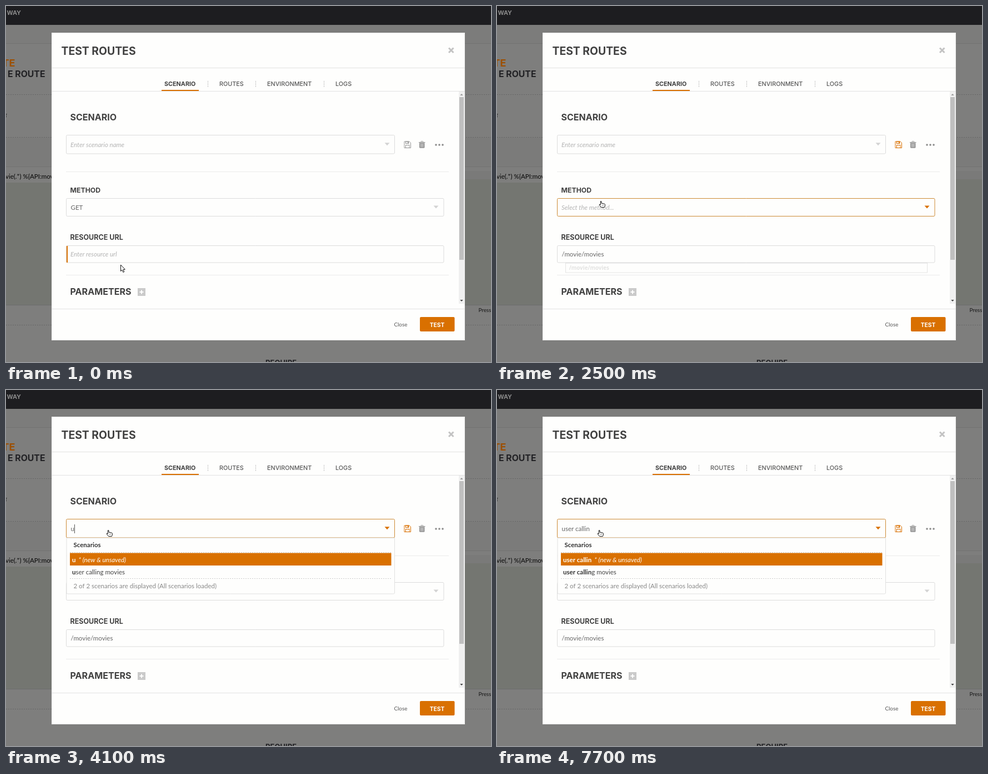
Write an HTML page with a canvas that moves like this. It is 873 by 641 pixels and loops after 8000 ms.

```html
<!DOCTYPE html>
<html lang="en">
<head>
<meta charset="utf-8">
<title>Test routes dialog</title>
<style>
html, body { margin: 0; width: 100%; height: 100%; overflow: hidden; background: #7e7e7d; }
canvas { display: block; }
</style>
</head>
<body>
<canvas id="stage" width="873" height="641"></canvas>
<script>
const ctx = document.getElementById('stage').getContext('2d');
const LOOP = 8000;
const ORANGE = '#d97000', PAPER = '#fefefd', INK = '#414141', GRAY = '#666', PALE = '#b4b4b4';
const HEAD = 'Inter, sans-serif', BODY = 'Lato, sans-serif', LIST = '"Open Sans", sans-serif';
const body = '11.5px ' + BODY, bold = 'bold ' + body, italic = 'italic ' + body;
const head = size => `bold ${size}px ${HEAD}`;

// Pointer stops: time, x, y, shape
const POINTER = [
  [0, 206, 466, 'arrow'], [300, 205, 462, 'arrow'], [500, 203, 454, 'beam'],
  [700, 199, 450, 'beam'], [1900, 201, 453, 'beam'], [2100, 200, 440, 'beam'],
  [2200, 194, 398, 'arrow'], [2300, 190, 366, 'hand'], [2400, 189, 359, 'hand'],
  [2500, 189, 357, 'hand'], [2700, 188, 342, 'arrow'], [2800, 186, 308, 'arrow'],
  [2900, 185, 279, 'arrow'], [3000, 184, 265, 'arrow'], [3100, 185, 262, 'hand'],
  [3200, 186, 259, 'hand'], [3300, 186, 258, 'hand']
];
// Time and number of characters typed
const TYPED = [[0, 0], [4100, 1], [4800, 2], [5000, 3], [5100, 4], [5700, 5], [6100, 6],
  [6200, 7], [6600, 8], [6700, 9], [6900, 10], [7100, 11]];
const NAME = 'user calling movies';
const ROUTES = ['/app', '/app/headers', '/app/uuid', '/test-http-signatures-auth', '/app/',
  '/test-httpbin/headers'];

const at = (keys, t) => keys.filter(k => k[0] <= t).pop();
const within = (t, a, b) => t >= a && t < b;

function rect(x, y, w, h, color) {
  ctx.fillStyle = color;
  ctx.fillRect(x, y, w, h);
}

function text(str, x, y, font, color, align = 'left') {
  ctx.font = font;
  ctx.fillStyle = color;
  ctx.textAlign = align;
  ctx.fillText(str, x, y);
  return x + ctx.measureText(str).width;
}

function round(x, y, w, h, r, fill, stroke) {
  ctx.beginPath();
  ctx.roundRect(x, y, w, h, r);
  if (fill) { ctx.fillStyle = fill; ctx.fill(); }
  if (stroke) { ctx.strokeStyle = stroke; ctx.lineWidth = 1; ctx.stroke(); }
}

function poly(points, fill, stroke) {
  ctx.beginPath();
  points.forEach(p => ctx.lineTo(p[0], p[1]));
  ctx.closePath();
  if (fill) { ctx.fillStyle = fill; ctx.fill(); }
  if (stroke) { ctx.strokeStyle = stroke; ctx.lineWidth = 1; ctx.stroke(); }
}

function dots(x, y, end, color, step = 4) {
  for (; x < end; x += step) rect(x, y, 2, 1, color);
}

const triangle = (x, y, w, h, color) => poly([[x - w, y], [x + w, y], [x, y + h]], color);
const caret = (x, y) => rect(Math.round(x), y, 1, 16, '#555');

function backdrop() {
  rect(0, 0, 873, 641, '#7e7e7d');
  rect(0, 0, 873, 34, '#1d1d20');
  rect(0, 34, 873, 33, '#7c7c7b');
  rect(0, 67, 873, 1, '#727272');
  rect(0, 237, 873, 53, '#7b7b7a');
  rect(0, 289, 873, 1, '#727272');
  rect(0, 297, 873, 241, '#747671');
  rect(0, 297, 82, 21, '#7e7e7d');
  rect(826, 297, 47, 15, '#7a7a79');
  rect(0, 538, 873, 1, '#6c6c6c');
  [159, 236, 574].forEach(y => dots(0, y, 873, '#666'));
  text('WAY', 27, 15.5, head(10.8), '#8b8b8b', 'right');
  text('TE', 16.5, 109, head(18), '#9c4f00', 'right');
  text('E ROUTE', 70.5, 128, head(15.8), '#222225', 'right');
  text('g', -3, 199, 'italic 10px ' + BODY, '#333');
  text('vie(.*) %{API:movie', -1, 311, body, '#050505');
  text('Press', 850.5, 551, '9.8px ' + BODY, '#161616');
  text('REQUIRE', 467, 647, head(13), '#222225');
}

function floppy(color) {
  poly([[717, 244], [726, 244], [728.5, 246.5], [728.5, 255.5], [717, 255.5]], null, color);
  ctx.strokeRect(719.5, 250.5, 6.5, 5);
  ctx.strokeRect(719.5, 244, 5, 3.5);
  rect(723, 244, 1.5, 3.5, color);
}

function trash() {
  const c = '#979797';
  rect(743, 245, 11.5, 1.3, c);
  round(746.8, 243.6, 4, 2, 1, null, c);
  round(744, 246.5, 9.5, 9.2, [0, 0, 1.5, 1.5], c);
  [746.3, 748.3, 750.3].forEach(x => rect(x, 248, .8, 5.8, '#e2e2e2'));
}

function field(x, y, w, h, active, arrowX) {
  round(x, y, w, h, 2, PAPER, active ? '#cc8a35' : '#dcdcdc');
  if (arrowX) triangle(arrowX, y + h / 2 - 3, 4.5, 5, active ? ORANGE : '#d3d3d3');
}

function dialog(t) {
  rect(82, 48, 744, 554, '#efefee');
  rect(83, 49, 742, 552, PAPER);
  text('TEST ROUTES', 99.5, 88, head(19.4), INK);
  ctx.lineWidth = 3;
  ctx.strokeStyle = '#c3c3c3';
  ctx.beginPath();
  ctx.moveTo(797, 75.5); ctx.lineTo(805.5, 84);
  ctx.moveTo(805.5, 75.5); ctx.lineTo(797, 84);
  ctx.stroke();

  [111, 153, 545].forEach(y => rect(82, y, 744, 1, '#e2e2e2'));
  text('SCENARIO', 285, 144, head(10.8), INK);
  const tab = '500 10.8px ' + HEAD;
  text('ROUTES', 384, 144, tab, '#595959');
  text('ENVIRONMENT', 470, 144, tab, '#595959');
  text('LOGS', 593, 144, tab, '#595959');
  [363, 449, 572].forEach(x => {
    for (let y = 135; y < 146; y += 3) rect(x, y, 1, 1.5, '#aaa');
  });
  rect(280, 151, 67, 2, ORANGE);

  rect(815, 154, 11, 382, '#f0f0f0');
  rect(816, 164, 8, 293, '#bfbfbf');
  triangle(820, 161, 2.7, -3, '#999');
  triangle(820, 529, 2.7, 3, '#444');

  text('SCENARIO', 115.5, 206, head(16), INK);
  floppy(t < 1500 ? '#979797' : ORANGE);
  trash();
  [774, 780, 786].forEach(x => {
    ctx.beginPath();
    ctx.arc(x, 250, 1.8, 0, 7);
    ctx.fillStyle = '#8b8b8b';
    ctx.fill();
  });
  [298, 484].forEach(y => rect(108, y, 689, 1, '#ebebeb'));

  text('METHOD', 115.5, 335.5, head(12.3), INK);
  field(108.5, 346.5, 679.5, 32, within(t, 2300, 2700), 774);
  if (within(t, 2400, 2700)) text('Select the method...', 116, 367, italic, PALE);
  else text('GET', 116.5, 367, body, GRAY);

  text('RESOURCE URL', 115.5, 421, head(12.5), INK);
  text('PARAMETERS', 115.5, 520, head(16.1), INK);
  rect(237, 508, 14, 14, '#cacaca');
  rect(240.5, 514, 7, 2, PAPER);
  rect(243, 511.5, 2, 7, PAPER);

  text('Close', 698.5, 577, '9.8px ' + BODY, '#555');
  round(745, 560, 62.5, 26, 2, ORANGE);
  text('TEST', 776, 577.7, head(10.3), PAPER, 'center');
}

function suggestions(items) {
  const h = 1 + items.length * 16.85;
  rect(108.5, 462.5, 681, h, '#fff');
  ctx.strokeStyle = '#111';
  ctx.lineWidth = 1;
  ctx.strokeRect(108.5, 462.5, 681, h);
  items.forEach((s, i) => text(s, 115, 475 + i * 16.8, 'bold 10.2px ' + LIST, '#000'));
}

function urlField(t) {
  field(108.5, 431.5, 679.5, 30.5, within(t, 700, 2400));
  if (t < 1500) rect(109, 432, 2, 30, ORANGE);
  if (t < 700) text('Enter resource url', 116, 451, italic, PALE);
  if (within(t, 700, 1200)) caret(116, 438);
  if (t >= 1500) {
    const end = text('/movie/movies', 116.5, 451, body, GRAY);
    if (t < 2400) caret(end, 438);
  }
  if (within(t, 800, 1500)) suggestions(ROUTES);
  if (within(t, 1500, 2700)) {
    // The popup shrinks and fades as it closes
    const p = Math.min(1, Math.max(0, (t - 2300) / 200));
    const s = 1 - .044 * p;
    ctx.save();
    ctx.globalAlpha = 1 - .89 * p;
    ctx.translate(449, 472);
    ctx.scale(s, s);
    ctx.translate(-449, -472);
    suggestions(['/movie/movies']);
    ctx.restore();
  }
}

function scenarioList(typed) {
  const extra = typed ? 22.5 : 0;
  round(109, 266.5, 590.5, 78 + extra, [0, 0, 2, 2], PAPER, '#e0e0e0');
  text('Scenarios', 121.5, 283, bold, '#333');
  dots(115, 292, 693, '#ccc');
  rect(115, 293.5, 578.5, 22.5, ORANGE);
  if (typed) {
    const end = text(typed.trimEnd(), 119, 309.5, bold, '#fff');
    text('* (new & unsaved)', end + 5, 309.5, italic, '#fff');
    const rest = text(typed, 119, 332, bold, '#333');
    text(NAME.slice(typed.length), rest, 332, body, '#444');
  } else {
    text(NAME, 119, 309.5, body, '#fff');
  }
  dots(115, 316.5 + extra, 693, '#ccc');
  const n = typed ? '2 of 2' : '1 of 1';
  text(n + ' scenarios are displayed (All scenarios loaded)', 121.5, 334.5 + extra, body, '#888');
}

function scenarioField(t) {
  const typed = NAME.slice(0, at(TYPED, t)[1]);
  field(108.5, 232.5, 591, 33.5, t >= 3100, 686);
  const end = typed ? text(typed, 116.5, 254, body, GRAY) : 116;
  if (!typed) text('Enter scenario name', 116, 254, italic, PALE);
  const blink = within(t, 3900, 4100) || within(t, 5500, 5700) || t >= 7700;
  if (t >= 3500 && !blink) caret(end, 242);
  if (t >= 3500) scenarioList(typed);
}

const SHAPES = {
  arrow() {
    poly([[.5, 0], [.5, 11.5], [3, 9.2], [4.9, 13.5], [6.8, 12.6], [5, 8.5], [8.3, 8.3]],
      '#fff', '#111');
  },
  beam() {
    rect(-3, -6, 6, 12, 'rgba(255,255,255,.7)');
    rect(-.6, -4.5, 1.3, 9, '#222');
    [-5, 4].forEach(y => rect(-2.5, y, 5, 1.2, '#222'));
  },
  hand() {
    poly([[-2.6, -5.3], [-1.2, -5.3], [-.6, -1.6], [4.6, -.8], [5.6, .5], [5.2, 3.6],
      [4.2, 5.6], [-1.2, 5.6], [-4.8, 1.2], [-4.4, 0], [-2.6, .8]], '#fff', '#111');
    [.2, 2.4].forEach(x => rect(x, .6, .8, 2.6, '#777'));
  }
};

function pointer(t) {
  const [, x, y, shape] = at(POINTER, t);
  ctx.save();
  ctx.translate(x, y);
  ctx.lineJoin = 'round';
  SHAPES[shape]();
  ctx.restore();
}

const start = performance.now();
function draw() {
  const t = Math.floor((performance.now() - start) % LOOP / 100) * 100;
  backdrop();
  dialog(t);
  urlField(t);
  scenarioField(t);
  pointer(t);
  requestAnimationFrame(draw);
}
draw();
</script>
</body>
</html>
```
